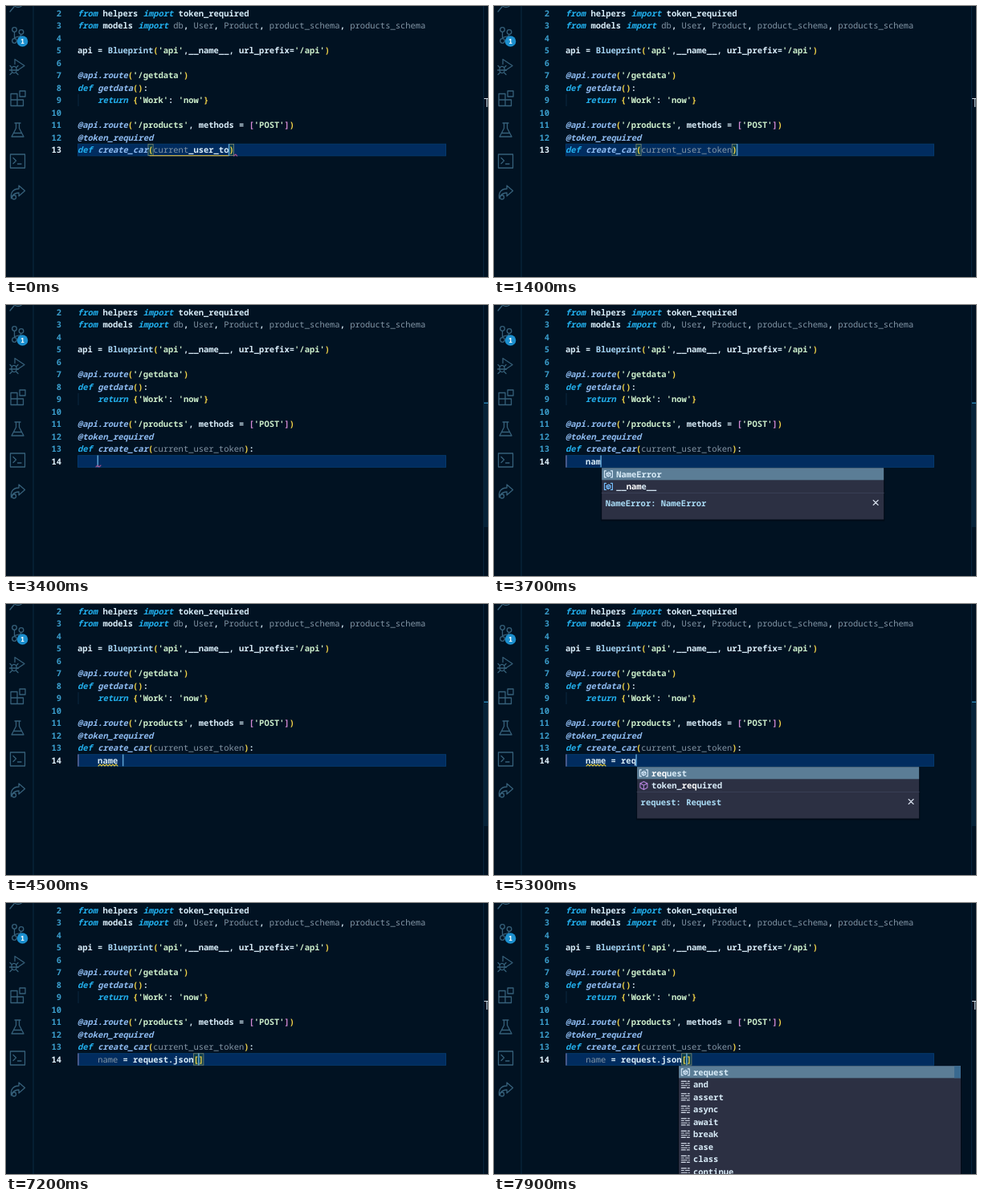
Recreate the animation shown at these times as an HTML page. Size 600 by 338 pixels, loop 8000 ms.

```html
<!DOCTYPE html>
<html lang="en">
<head>
<meta charset="utf-8">
<title>Code editor</title>
<style>
html, body { margin: 0; width: 100%; height: 100%; overflow: hidden; background: #011222; }
svg { display: block; width: 600px; height: 338px; }
text {
  font: 600 10.47px "Noto Sans Mono", "DejaVu Sans Mono", monospace;
  fill: #d9ecf8; white-space: pre; text-rendering: geometricPrecision;
}
.k { fill: #22b0ee; font-style: italic; }
.d { fill: #8fbcf2; font-style: italic; }
.f { fill: #a5d4f4; }
.s { fill: #cdeecb; }
.u { fill: #8496a6; font-weight: 500; }
.y { fill: #f3d548; }
.p { fill: #d58bd6; }
.b { font-weight: 800; fill: #fff; }
.n { fill: #3a9cca; text-anchor: end; }
.now { fill: #e2f1fb; }
.info { fill: #a9dbf5; }
.line { fill: none; stroke-width: 1.1; stroke-linejoin: round; stroke-linecap: round; }
</style>
</head>
<body>
<svg viewBox="0 0 600 338">
  <rect width="600" height="338" fill="#011222"/>
  <path d="M34 0V338" stroke="#0a2a42"/>
  <path d="M594.500 0V338" stroke="#08253c"/>
  <g class="line" stroke="#36607a" style="stroke-width:1.3" transform="translate(0 -.5)">
    <circle cx="15" cy="-5" r="7"/><path d="M10 1.500L5 7.500"/>
    <circle cx="10.5" cy="30" r="2.8"/><circle cx="10.5" cy="44" r="2.8"/><circle cx="19" cy="33" r="2.8"/>
    <path d="M10.5 33V41M19 36C19 40 11 38 10.5 41"/>
    <path d="M11 73V67L23 75L14 81"/><ellipse cx="10" cy="80" rx="3.2" ry="4.2"/>
    <path d="M5 75L7.5 77.5M15 75L12.5 77.5M4.5 80.5H15.5M5 86L7.5 83.5M15 86L12.5 83.5"/>
    <path d="M6 110H14V125H6ZM6 117.500H21.500V125H14M17 106.500H24V113.500H17Z"/>
    <path d="M11 146.500H18M12.500 146.500V153L7 163.500H22L16.500 153V146.500M9.500 159H19.500"/>
    <path d="M5.500 185.500H23.500V202.500H5.500ZM9 190L12.500 193.500L9 197M14.500 197.500H19"/>
    <path d="M16 224.500L23.500 231L16 237.500V233.500C11 233.500 8 236 6.500 240.500C5.500 233 9 228.500 16 228.500Z"/>
    <circle cx="10" cy="239" r="2.5"/>
  </g>
  <circle cx="20.500" cy="44" r="6.800" fill="#1c8fce"/>
  <text x="20.500" y="47.200" text-anchor="middle" style="font-size:8.5px;fill:#fff">1</text>
  <g id="view"></g>
</svg>
<script>
const LOOP = 8000, LEFT = 89, CHAR = 6.28, PITCH = 15.5;
const view = document.getElementById('view');
const middle = n => 8.8 + (n - 2) * PITCH;
const column = c => LEFT + c * CHAR;

// x<...> colours a run of text with class x
const fixedLines = {
  2: 'k<from> helpers k<import> token_required',
  3: 'k<from> models k<import> u<db>, u<User>, u<Product>, u<product_schema>, u<products_schema>',
  4: '',
  5: "api = f<Blueprint>y<(>s<'api'>,__name__, url_prefix=s<'/api'>y<)>",
  6: '',
  7: "d<@api.route>y<(>s<'/getdata'>y<)>",
  8: 'k<def> d<getdata>y<()>:',
  9: "    k<return> y<{>s<'Work'>: s<'now'>y<}>",
  10: '',
  11: "d<@api.route>y<(>s<'/products'>, methods = p<[>s<'POST'>p<]>y<)>",
  12: 'd<@token_required>'
};

// Icon kinds: v variable, m method, w property, k keyword; + marks a star
const lists = {
  name: ['v*NameError', 'v*__name__', 'NameError: NameError'],
  r: 'v*request k*return k*raise v*range v*repr v*reversed v*round v*RuntimeError v*ResourceWarning'.split(' '),
  req: ['v*request', 'm*token_required', 'request: Request'],
  dot: ['w+args', 'w+form', 'm+get_data', 'v+content_type', 'w+base_url', 'v+method',
    'w*accept_charsets', 'w*accept_encodings', 'w*accept_languages'],
  json: ['w*json', 'm*get_json', 'w*is_json', 'm*json_module', 'm*on_json_loading_failed'],
  key: ['v*request', ...'and assert async await break case class continue'.split(' ').map(w => 'k*' + w)]
};

// Time, argument on line 13, typed text on line 14 (absent before Enter), list
const ARG = 'current_user_token';
const steps = [
  [0, 'current_user_to'], [100, 'current_user_tok'], [200, 'current_user_toke'], [300, ARG],
  [2300, ARG, ''],
  [3500, ARG, 'n', 'name'], [3600, ARG, 'na', 'name'], [3700, ARG, 'nam', 'name'], [3800, ARG, 'name', 'name'],
  [4500, ARG, 'name '], [4700, ARG, 'name ='], [4900, ARG, 'name = '],
  [5100, ARG, 'name = r', 'r'], [5200, ARG, 'name = re', 'r'], [5300, ARG, 'name = req', 'req'],
  [5500, ARG, 'name = requ', 'req'], [5600, ARG, 'name = reque', 'req'],
  [5700, ARG, 'name = reques', 'req'], [5800, ARG, 'name = request', 'req'],
  [6200, ARG, 'name = request.'], [6300, ARG, 'name = request.', 'dot'],
  [6600, ARG, 'name = request.j', 'json'], [6700, ARG, 'name = request.js', 'json'],
  [6800, ARG, 'name = request.jso', 'json'], [6900, ARG, 'name = request.json', 'json'],
  [7200, ARG, 'name = request.json['], [7300, ARG, 'name = request.json[', 'key']
];

const paint = s => s.replace(/([a-z])<([^>]*)>/g, '<tspan class="$1">$2</tspan>');
const text = (x, y, s, cls = '') => `<text x="${x}" y="${y + 3.7}" class="${cls}">${s}</text>`;
const rect = (x, y, w, h, fill) => `<rect x="${x}" y="${y}" width="${w}" height="${h}" fill="${fill}"/>`;
const stroke = (d, color) => `<path class="line" d="${d}" stroke="${color}"/>`;
const caret = (c, n) => rect(column(c) - .6, middle(n) - 7.3, 1.5, 14.8, '#5b9fd0');
const bracketBox = (c, n) =>
  `<rect x="${column(c)}" y="${middle(n) - 7}" width="6.2" height="14.300" fill="#0b3d4f" stroke="#7f8a72" stroke-width=".8"/>`;
const lineNumber = (n, cls = '') => text(69, middle(n), n, 'n ' + cls);
const codeText = (n, s) => text(LEFT, middle(n), paint(s));
const currentLine = n =>
  `<rect x="89.500" y="${middle(n) - 7.1}" width="458" height="14.600" fill="#012c5f" stroke="#04386c"/>` +
  lineNumber(n, 'now');

function wave(x, end, y, color) {
  let d = `M${x} ${y}`;
  for (let i = 1; x + i * 2 <= end; i++) d += `L${x + i * 2} ${y + (i % 2 ? -2 : 0)}`;
  return stroke(d, color);
}

const icons = {
  v: stroke('M-3 -4H-5V4H-3M3 -4H5V4H3M-2.5 -1L0.5 -2.5L2.5 -1V1.500L-.5 3L-2.5 1.500ZM-2.5 -1L-.5 .2L2.500 -1M-.5 .2V3', '#75beff'),
  m: stroke('M0 -5L4.500 -2.700V2.700L0 5L-4.500 2.700V-2.700ZM-4.500 -2.700L0 -.3L4.500 -2.700M0 -.3V5', '#b180d7'),
  w: stroke('M-5 3L0 -2C-1 -5 2 -6 3.500 -5L1.500 -2.800L3 -1.300L5 -3.200C6 -1 4 1.500 1.800 .5L-3 5C-4.500 5.500 -5.800 4.500 -5 3Z', '#d6deeb'),
  k: stroke('M-5 -4H1M3 -4H5M-5 -1.400H-2M0 -1.400H5M-5 1.300H2M4 1.300H5M-5 4H0M2 4H5', '#d6deeb')
};

function star(x, y) {
  const points = Array.from({ length: 10 }, (_, i) => {
    const a = i * Math.PI / 5, r = i % 2 ? 1.9 : 4.7;
    return `${x + r * Math.sin(a)},${y - r * Math.cos(a)}`;
  });
  return `<polygon points="${points.join(' ')}" fill="#e2eaf2"/>`;
}

function suggestions(name, caretColumn, typed) {
  const rows = lists[name], x = Math.min(column(caretColumn) + 1.2, 230), top = 203;
  const small = rows.length === 3, long = rows.length > 5;
  const height = small ? 64.5 : long ? 140 : rows.length * PITCH + 2;
  let out = rect(x - 1, top, 353, height + 2, '#010b17') + rect(x, top, 351, height, '#2c3043') +
    rect(x, top + .3, 351, 15, '#5b7d96');
  if (long) out += rect(x + 343, top + .3, 8, 15, '#39698f');
  rows.forEach((row, i) => {
    const y = 210.9 + i * PITCH;
    if (small && i === 2) {
      out += stroke(`M${x} 234.500H${x + 351}`, '#383e54') + text(x + 4.5, 247, row, 'info') +
        stroke(`M${x + 338} 243.500l6 6m0 -6l-6 6`, '#d6deeb');
      return;
    }
    const starred = row[1] === '+', label = row.slice(2);
    const kind = i ? icons[row[0]] : icons[row[0]].replace('#75beff', '#d6e9fa');
    out += `<g transform="translate(${x + 8.3} ${y})">${kind}</g>`;
    if (starred) out += star(x + 23, y);
    const marked = typed ? label.replace(typed, `b<${typed}>`) : label;
    out += text(x + (starred ? 34 : 18), y, paint(marked));
  });
  return out;
}

function signatureLine(t, arg, current) {
  const close = 15 + arg.length, ended = t >= 1900, checked = t >= 1400;
  const param = checked ? `u<${arg}>` : `u<current>${arg.slice(7)}`;
  let out = current ? currentLine(13) : lineNumber(13);
  if (!ended) out += bracketBox(14, 13) + bracketBox(close, 13);
  out += codeText(13, `k<def> d<create_car>y<(>${param}y<)>${ended ? ':' : ''}`);
  if (!checked) out += stroke(`M179 186.600H${column(close)}`, '#c9b04a');
  if (t < 500) out += wave(column(close + 1), column(close + 1) + 4, 187, '#b0508a');
  if (current) out += caret(t < 500 ? close : ended ? close + 2 : close + 1, 13);
  return out;
}

function bodyLine(t, body, list) {
  const inKey = body.endsWith('['), col = 4 + body.length;
  let out = currentLine(14);
  if (inKey) out += bracketBox(col - 1, 14) + bracketBox(col, 14);
  out += codeText(14, inKey ? '    u<name> = request.jsony<[]>' : '    ' + body) + caret(col, 14);
  if (body) out += rect(89.5, 187.5, 1, 15, '#8a7fb0');
  else if (t >= 2800) out += wave(112, 118, 202, '#a0508a');
  if (body.startsWith('name ') && !inKey) out += wave(115, 140, 202, '#e0c53c');
  if (list) out += suggestions(list, col, body.match(/\w*$/)[0]);
  return out;
}

function rightEdge(t) {
  const pointer = y => stroke(`M595.500 ${y}H600M598.700 ${y}V${y + 10}`, '#d3dee6');
  if (t < 1900) return pointer(115.5);
  if (t >= 7200) return pointer(122.5);
  return (t < 2300 ? '' : rect(595, 123, 5, 154, '#062238')) + rect(595, 121.5, 5, 1.5, '#287fae');
}

function scene(t) {
  const [, arg, body, list] = steps.findLast(s => s[0] <= t);
  const entered = body !== undefined;
  let out = rect(89.5, 110, 1, 15, '#0a2940') + rightEdge(t);
  for (const n in fixedLines) out += lineNumber(+n) + codeText(+n, fixedLines[n]);
  out += signatureLine(t, arg, !entered);
  return entered ? out + bodyLine(t, body, list) : out;
}

const start = performance.now();
let shown = '';
function tick() {
  const next = scene((performance.now() - start) % LOOP);
  if (next !== shown) view.innerHTML = shown = next;
  requestAnimationFrame(tick);
}
tick();
</script>
</body>
</html>
```
